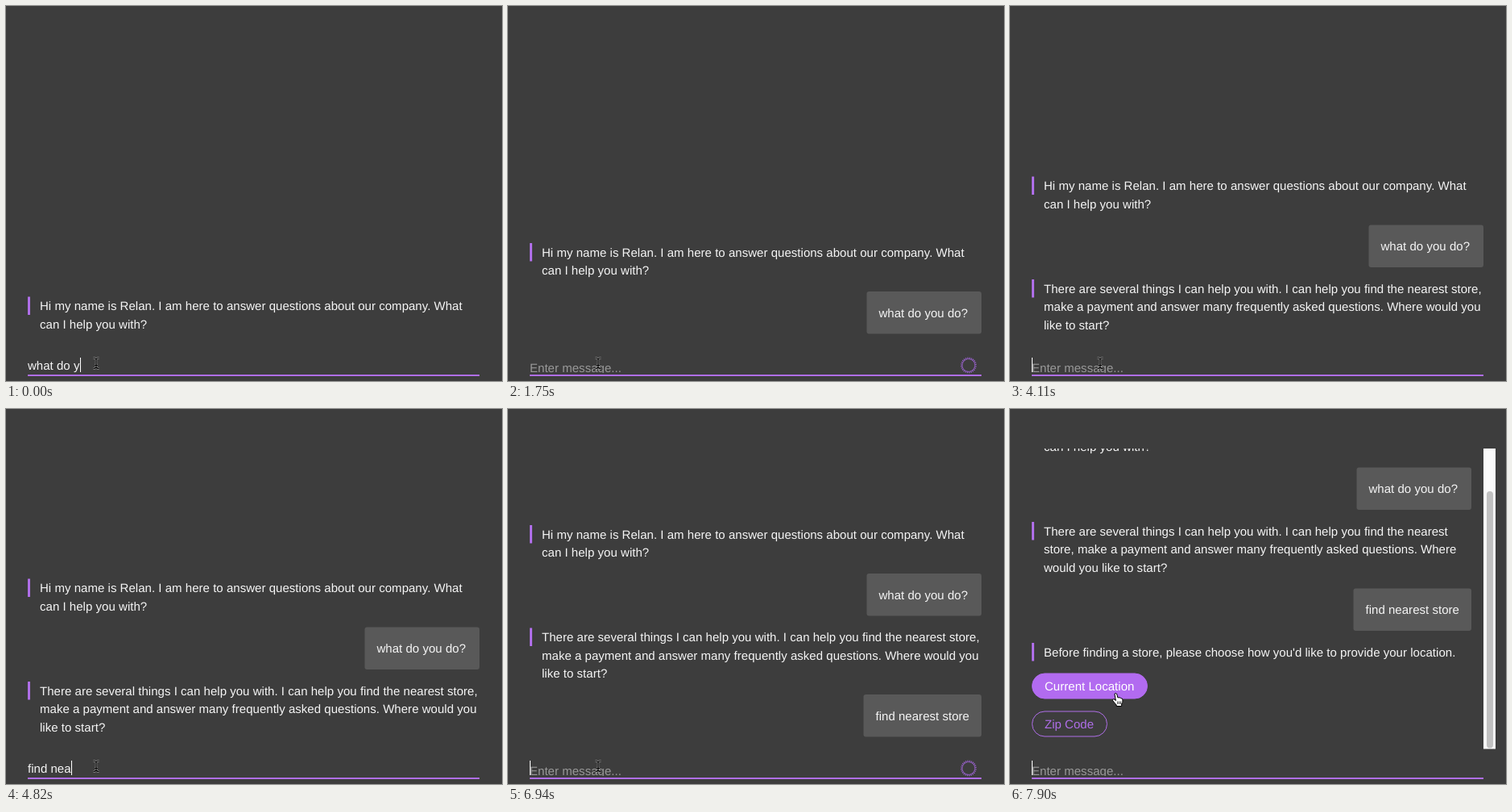
Write an HTML page that moves like this. It is 616 px wide and 465 px high and loops after 8000 ms.

```html
<!DOCTYPE html>
<html lang="en">
<head>
<meta charset="utf-8">
<title>Chat assistant</title>
<style>
  html, body { margin: 0; width: 100%; height: 100%; overflow: hidden; background: #3d3d3d; }
  svg { display: block; }
  text {
    font: 15px "Liberation Sans", Arial, sans-serif;
    letter-spacing: .03px;
    text-rendering: geometricPrecision;
    white-space: pre;
    fill: #f5f5f5;
  }
  .hint { fill: #989898; }
  .bar, .rule { fill: #af6ee8; }
  .bubble { fill: #595959; }
  .pill { fill: none; stroke: #af6ee8; }
  .pill + text { fill: #af6ee8; }
  .pill.on { fill: #b26bf0; stroke: #b26bf0; }
  .pill.on + text { fill: #fff; }
  .spinner { fill: none; stroke: #9561c6; }
</style>
</head>
<body>
<svg width="616" height="465" viewBox="0 0 616 465">
  <defs>
    <clipPath id="view"><rect y="49" width="616" height="373"/></clipPath>
    <clipPath id="field"><rect y="430" width="616" height="25"/></clipPath>
  </defs>
  <g id="thread" clip-path="url(#view)"></g>
  <g id="scrollbar">
    <rect x="588" y="49" width="15" height="372.5" fill="#fafafa"/>
    <rect x="592" y="102" width="8" height="318.5" rx="4" fill="#c1c1c1"/>
  </g>
  <text id="hint" class="hint" x="27" y="453.5" clip-path="url(#field)">Enter message...</text>
  <text id="typed" x="27" y="451"></text>
  <rect id="caret" y="436" width="1" height="18" fill="#fff"/>
  <g id="spinner" class="spinner">
    <circle r="8.6" stroke-width="2.6" pathLength="48" stroke-dasharray="1 1"/>
    <circle r="8" stroke-width="1" opacity=".65"/>
  </g>
  <rect class="rule" x="27" y="457" width="561" height="2"/>
  <g id="pointer"></g>
</svg>
<script>
const LOOP = 8000, LINE = 22.5, GAP = 15, LEFT = 27;
const $ = id => document.getElementById(id);

const hello = { lines: [
  "Hi my name is Relan. I am here to answer questions about our company. What",
  "can I help you with?"] };
const ask = { say: "what do you do?", width: 142.5 };
const help = { lines: [
  "There are several things I can help you with. I can help you find the nearest store,",
  "make a payment and answer many frequently asked questions. Where would you",
  "like to start?"] };
const helpNarrow = { lines: [
  "There are several things I can help you with. I can help you find the nearest",
  "store, make a payment and answer many frequently asked questions. Where",
  "would you like to start?"] };
const find = { say: "find nearest store", width: 146.5 };
const locate = { lines: [
  "Before finding a store, please choose how you'd like to provide your location."] };
const current = { pill: "Current Location", width: 143.5 };
const zip = { pill: "Zip Code", width: 93.5 };

const threads = [
  [0, [hello]],
  [1050, [hello, ask]],
  [2570, [hello, ask, help]],
  [5990, [hello, ask, help, find]],
  [7180, [hello, ask, helpNarrow, find, locate, current, zip]]
];
const typing = [
  [0, "what do y"], [110, "what do yo"], [230, "what do you "], [580, "what do you d"],
  [700, "what do you do"], [930, "what do you do?"], [1050, ""],
  [4350, "f"], [4470, "fin"], [4590, "find "], [4700, "find n"], [4820, "find nea"],
  [4940, "find near"], [5050, "find neare"], [5170, "find neares"], [5280, "find nearest"],
  [5400, "find nearest s"], [5520, "find nearest sto"], [5630, "find nearest store"], [5990, ""]
];
// caret flips at each of these times, starting visible
const blinks = [1400, 1870, 2220, 2570, 2920, 3270, 3750, 4110, 6350, 6710, 7180, 7540];
const pointers = [
  [0, ["beam", 112, 443]], [7660, ["arrow", 115, 420]],
  [7780, ["arrow", 123, 384]], [7900, ["hand", 131, 353]]
];
const beam = "M-3.5-6.5Q-.5-6.5 0-5Q.5-6.5 3.5-6.5M0-5V5M-3.5 6.5Q-.5 6.5 0 5Q.5 6.5 3.5 6.5M-2 2.5H2";
const shapes = {
  beam: `<path d="${beam}" fill="none" stroke="#b5b5b5" stroke-width="2.4" opacity=".75"/>
         <path d="${beam}" fill="none" stroke="#000" stroke-width="1.2"/>`,
  arrow: `<path d="M0 0V14L3.2 11L5.5 16L7.8 15L5.6 10.2H10Z" fill="#000" stroke="#fff"/>`,
  hand: `<path d="M-1 1Q-1-.7.4-.5Q1.5-.4 1.8 1L3 5.2Q3.6 4 5 5Q6.2 4.4 6.9 5.8Q8.6 5.4 8.9 7.5
         Q9.4 11 7.6 13V15.5H1.2V14Q-1.6 11-3.3 8.7Q-4 7-2.5 6.8Q-1.2 6.8.4 8.6Z"
         fill="#fff" stroke="#000" stroke-linejoin="round"/>
         <path d="M2.7 9.5V13M4.7 9.5V13M6.6 9.5V13" stroke="#000" stroke-width=".8"/>`
};

const at = (steps, t) => steps.filter(s => s[0] <= t).pop()[1];
const label = (x, y, s) => `<text x="${x}" y="${y}">${s}</text>`;
const height = m => m.lines ? m.lines.length * LINE : m.say ? 52.5 : 32;

function draw(m, y, right, hover) {
  if (m.lines) return `<rect class="bar" x="${LEFT}" y="${y}" width="3" height="${LINE}"/>` +
    m.lines.map((s, i) => label(42, y + 16.5 + i * LINE, s)).join("");
  if (m.say) {
    const x = right - m.width;
    return `<rect class="bubble" x="${x}" y="${y}" width="${m.width}" height="52.5" rx="3"/>` +
      label(x + 15, y + 31.5, m.say);
  }
  return `<rect class="pill ${hover ? "on" : ""}" x="${LEFT + .5}" y="${y + .5}" width="${m.width - .5}"
    height="31" rx="15.5"/>` + label(43, y + 21.5, m.pill);
}

function drawThread(list, bottom, right, hover) {
  let y = bottom, out = "";
  for (const m of [...list].reverse()) {
    y -= GAP + height(m);
    out += draw(m, y, right, hover && m === current);
  }
  return out;
}

let shown = "";
function render(t) {
  const list = at(threads, t), text = at(typing, t), [kind, px, py] = at(pointers, t);
  const full = list.includes(zip);
  const bottom = text ? 420.5 : 421.5;
  const key = [list.length, bottom, kind].join();
  if (key !== shown) {
    shown = key;
    $("thread").innerHTML = drawThread(list, bottom, full ? 573 : 588, kind === "hand");
    $("pointer").innerHTML = shapes[kind];
  }
  $("pointer").setAttribute("transform", `translate(${px} ${py})`);
  $("scrollbar").style.display = full ? "" : "none";

  const typed = $("typed");
  if (typed.textContent !== text) typed.textContent = text;
  $("hint").style.display = text ? "none" : "";
  const caret = $("caret");
  caret.setAttribute("x", text ? Math.round(LEFT + typed.getComputedTextLength() + .8) : LEFT);
  const lit = blinks.filter(b => b <= t).length % 2 === 0;
  caret.style.display = text || lit ? "" : "none";

  const waiting = (t >= 1050 && t < 2570) || (t >= 5990 && t < 7180);
  $("spinner").style.display = waiting ? "" : "none";
  $("spinner").setAttribute("transform", `translate(572 445.5) rotate(${Math.floor(t / 117) * 40})`);
}

const start = performance.now();
function tick() {
  render((performance.now() - start) % LOOP);
  requestAnimationFrame(tick);
}
tick();
</script>
</body>
</html>
```
